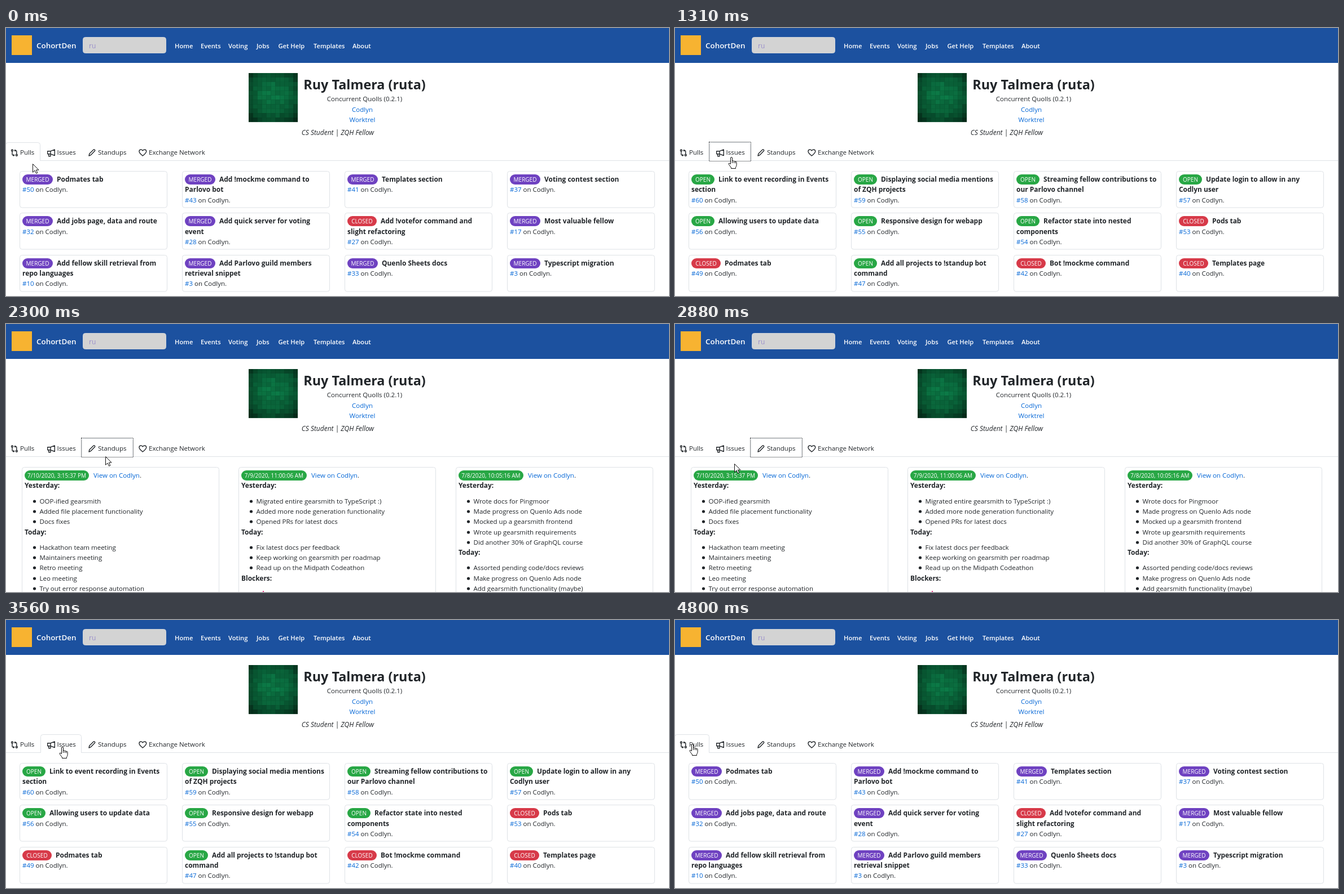
An HTML page that plays this animation: 1175x476 px, repeating every 5420 ms.

```html
<!DOCTYPE html>
<html lang="en">
<head>
<meta charset="utf-8">
<title>Fellow profile</title>
<style>
html, body { margin: 0; width: 100%; height: 100%; overflow: hidden; background: #fff; }
svg { display: block; width: 100%; height: 100%; font: 11.5px "Open Sans", "Noto Sans", sans-serif; }
text { fill: #212529; white-space: pre; }
.bold { font-size: 11.95px; font-weight: 700; }
.link { fill: #0366d6; }
.pill { fill: #fff; font-size: 10px; text-anchor: middle; }
.mid { text-anchor: middle; }
.name { font-size: 23.4px; font-weight: 700; }
.nav { fill: #fff; font-size: 11.2px; font-weight: 600; }
.brand { fill: #fff; font-size: 13.4px; font-weight: 600; }
.hint { fill: #9b90cb; font-size: 12px; }
.role { font-size: 12px; font-style: italic; }
.card { fill: #fff; stroke: #dee2e6; }
.icon { fill: none; stroke: #212529; stroke-width: 1.4; stroke-linejoin: round; }
.ring { fill: none; stroke: #212529; stroke-dasharray: 1 1; shape-rendering: crispEdges; }
.cursor { fill: #fff; stroke: #111; stroke-linejoin: round; }
</style>
</head>
<body>
<svg id="stage" viewBox="0 0 1175 476"></svg>
<script>
const LOOP = 5420;
const stage = document.getElementById('stage');

const text = (x, y, content, cls = '') => `<text x="${x}" y="${y}" class="${cls}">${content}</text>`;
const rect = (x, y, w, h, attrs) => `<rect x="${x}" y="${y}" width="${w}" height="${h}" ${attrs}/>`;
const path = (d, cls) => `<path d="${d}" class="${cls}"/>`;
const pill = (x, y, w, label, color) =>
  rect(x, y - 13, w, 18, `rx="9" fill="${color}"`) + text(x + w / 2, y, label, 'pill');

const BADGES = {
  M: ['MERGED', 54, '#6f42c1'],
  O: ['OPEN', 41, '#28a745'],
  C: ['CLOSED', 52, '#d73a49'],
};

const PULLS = [
  'M|50|Podmates tab', 'M|43|Add !mockme command to|Parlovo bot',
  'M|41|Templates section', 'M|37|Voting contest section',
  'M|32|Add jobs page, data and route', 'M|28|Add quick server for voting|event',
  'C|27|Add !votefor command and|slight refactoring', 'M|17|Most valuable fellow',
  'M|10|Add fellow skill retrieval from|repo languages', 'M|3|Add Parlovo guild members|retrieval snippet',
  'M|33|Quenlo Sheets docs', 'M|3|Typescript migration',
];

const ISSUES = [
  'O|60|Link to event recording in Events|section', 'O|59|Displaying social media mentions|of ZQH projects',
  'O|58|Streaming fellow contributions to|our Parlovo channel', 'O|57|Update login to allow in any|Codlyn user',
  'O|56|Allowing users to update data', 'O|55|Responsive design for webapp',
  'O|54|Refactor state into nested|components', 'C|53|Pods tab',
  'C|49|Podmates tab', 'O|47|Add all projects to !standup bot|command',
  'C|42|Bot !mockme command', 'C|40|Templates page',
];

const STANDUPS = [
  { date: '7/10/2020, 3:15:37 PM', width: 114, parts: [
    ['Yesterday:', 'OOP-ified gearsmith', 'Added file placement functionality', 'Docs fixes'],
    ['Today:', 'Hackathon team meeting', 'Maintainers meeting', 'Retro meeting', 'Leo meeting', 'Try out error response automation'],
  ] },
  { date: '7/9/2020, 11:00:06 AM', width: 116, parts: [
    ['Yesterday:', 'Migrated entire gearsmith to TypeScript :)', 'Added more node generation functionality', 'Opened PRs for latest docs'],
    ['Today:', 'Fix latest docs per feedback', 'Keep working on gearsmith per roadmap', 'Read up on the Midpath Codeathon'],
    ['Blockers:'],
  ] },
  { date: '7/8/2020, 10:05:16 AM', width: 115, parts: [
    ['Yesterday:', 'Wrote docs for Pingmoor', 'Made progress on Quenlo Ads node', 'Mocked up a gearsmith frontend', 'Wrote up gearsmith requirements', 'Did another 30% of GraphQL course'],
    ['Today:', 'Assorted pending code/docs reviews', 'Make progress on Quenlo Ads node', 'Add gearsmith functionality (maybe)'],
  ] },
];

function ticketCard(entry, index) {
  const [kind, number, ...lines] = entry.split('|');
  const [label, width, color] = BADGES[kind];
  const left = 24 + 288 * (index % 4);
  const row = Math.floor(index / 4);
  const baseline = line => Math.round(273 + 74.4 * row + 18.3 * line);
  const x = left + 5;
  return rect(left + 0.5, Math.round(254 + 74.4 * row) + 0.5, 261, 64.5, 'rx="4" class="card"') +
    pill(x, baseline(0), width, label, color) +
    lines.map((line, i) => text(i ? x : x + width + 7, baseline(i), line, 'bold')).join('') +
    text(x, baseline(lines.length), `<tspan class="link">#${number}</tspan> on Codlyn.`);
}

function standupCard({ date, width, parts }, index) {
  const left = 28 + Math.round(384.3 * index);
  const x = left + 5;
  let y = 273;
  let out = rect(left + 0.5, 254.5, 349, 260, 'rx="4" class="card"') +
    pill(x, y, width, date, '#28a745') +
    text(x + width + 8, y, '<tspan class="link">View on Codlyn</tspan>.');
  for (const [heading, ...items] of parts) {
    y += 18.3;
    out += text(x, Math.round(y), heading, 'bold');
    y += 9;
    for (const item of items) {
      y += 18.3;
      out += `<circle cx="${left + 22.5}" cy="${Math.round(y) - 4}" r="2.6" fill="#212529"/>` +
        text(left + 31.5, Math.round(y), item);
    }
  }
  return out;
}

function avatar() {
  let out = rect(430, 80, 87, 87, 'fill="#033d20"');
  const noise = n => { const v = Math.sin(n * 127.1 + 3.7) * 43758.5; return v - Math.floor(v); };
  for (let i = 0; i < 121; i++) {
    const col = i % 11, row = Math.floor(i / 11);
    const edge = Math.hypot(col - 5, row - 4.5) / 7;
    const light = (1 - 0.55 * edge * edge) * (0.9 + 0.2 * noise(i));
    const color = [11, 114, 66].map(c => Math.round(c * light));
    out += rect(430 + col * 7.91, 80 + row * 7.91, 8, 8, `fill="rgb(${color})"`);
  }
  return out;
}

function header() {
  const links = [['Home', 299], ['Events', 345], ['Voting', 394], ['Jobs', 444],
    ['Get Help', 482.5], ['Templates', 545], ['About', 614]];
  return rect(0, 0, 1175, 62, 'fill="#1c519f"') +
    rect(10, 13, 36, 35, 'fill="#f7b331"') +
    text(54, 36, 'CohortDen', 'brand') +
    rect(136.5, 16.5, 147, 28, 'rx="4" fill="#d3d3d3" stroke="#ced4da"') +
    text(147, 36, 'ru', 'hint') +
    links.map(([label, x]) => text(x, 36, label, 'nav')).join('');
}

function profile() {
  return avatar() +
    text(635.5, 109, 'Ruy Talmera (ruta)', 'mid name') +
    text(635.5, 130, 'Concurrent Quolls (0.2.1)', 'mid') +
    text(631.5, 149, 'Codlyn', 'mid link') +
    text(631.5, 167, 'Worktrel', 'mid link') +
    text(588, 190, 'CS Student | ZQH Fellow', 'mid role');
}

function tabLabels() {
  return path('M11 219.5v4.500q0 2 2 2h1M13.200 224.600l1.400 1.400-1.400 1.400M18.800 223.800v-4.300q0-2-2-2h-1M16.600 216.100l-1.400 1.400 1.400 1.400', 'icon') +
    '<circle cx="11" cy="217.5" r="1.5" class="icon"/><circle cx="18.8" cy="225.7" r="1.5" class="icon"/>' +
    path('M73.7 218.7h5.3l7.3-2.7v10.5l-7.3-2.7h-5.3zM75.7 224v3.7h3.3V224M79 219v4.5', 'icon') +
    path('M147 227l.9-3.8 7.3-7.2q1-.8 2 .2t.2 2l-7.2 7.5z', 'icon') +
    path('M242.3 227C238.5 224 236 221.8 236 219.2C236 215.3 240.5 214.8 242.3 218C244.2 214.8 248.7 215.3 248.7 219.2C248.7 221.8 246 224 242.3 227z', 'icon') +
    text(25, 225, 'Pulls') + text(90.5, 225, 'Issues') +
    text(163, 225, 'Standups') + text(253, 225, 'Exchange Network');
}

const activeTab = (left, right) =>
  path(`M${left} 235.5V207.5q0-4 4-4H${right - 4}q4 0 4 4V235.5`, 'card') +
  rect(left + 0.5, 235, right - left - 1, 1, 'fill="#fff"');
const focusRing = (left, right) =>
  rect(left - 1, 202.5, right - left + 2, 33.5, 'class="ring"');

const TABS = {
  pulls: { edges: [-0.5, 60.5], body: PULLS.map(ticketCard).join('') },
  issues: { edges: [61.5, 133.5], body: ISSUES.map(ticketCard).join('') },
  standups: { edges: [134.5, 224.5],
    body: STANDUPS.map(standupCard).join('') + rect(455, 474, 2, 2, 'fill="#e83e8c"') },
};

stage.innerHTML = header() + profile() + rect(0, 235, 1175, 1, 'fill="#dee2e6"') +
  Object.entries(TABS).map(([id, { edges, body }]) =>
    `<g id="${id}">${activeTab(...edges)}${body}<g id="${id}Ring">${focusRing(...edges)}</g></g>`).join('') +
  tabLabels() +
  '<g id="cursor">' +
  '<path id="arrow" class="cursor" d="M.5.5V15.3l3.5-3.3 2.5 5.3 2.3-1-2.4-5.2h4.6z"/>' +
  '<path id="hand" class="cursor" d="M-1.5 12.5V2q0-1.5 1.5-1.5T1.5 2v5q1.8-1.2 2.8.6 1.8-.8 2.6.8 2-.5 2.2 1.3v4.5q0 2.3-1.6 4.3v2H-.5v-1.5l-3.8-5.2q-1.5-2.2 0-2.7 1.2-.3 2.8 1.7zM1.5 7v4M4.3 8v3M6.9 8.5v2.8"/>' +
  '</g>';

// [start, tab, focus ring]
const SCENES = [
  [0, 'pulls', false], [1000, 'issues', false], [1310, 'issues', true],
  [2140, 'standups', false], [2200, 'standups', true],
  [3560, 'issues', false], [3930, 'issues', true], [4800, 'pulls', false],
];

// [first step, last step, number of steps]
const RUNS = [
  [140, 680, 10], [740, 740, 1], [880, 930, 2], [1000, 1000, 1], [1310, 1830, 9], [1880, 1940, 2],
  [2140, 2680, 10], [2740, 2880, 3], [2930, 3260, 6], [3370, 3560, 3],
  [3930, 4360, 8], [4440, 4440, 1], [4500, 4800, 6],
];
const STEPS = [0, ...RUNS.flatMap(([first, last, count]) =>
  Array.from({ length: count }, (_, i) => first + (last - first) * i / Math.max(1, count - 1)))];

// pointer hotspot: [time, x, y]
const TRAIL = [
  [0, 47, 241], [140, 48, 242], [260, 58, 237], [380, 76, 228], [500, 97, 217], [560, 106, 215],
  [620, 105, 220], [680, 101, 227], [740, 100, 226], [930, 99, 225], [1000, 99, 225],
  [1310, 100, 229], [1430, 112, 243], [1550, 140, 252], [1670, 180, 244], [1765, 197, 233],
  [1830, 180, 227], [1940, 176, 224], [2140, 176, 224], [2320, 176, 240], [2500, 168, 250],
  [2680, 142, 251], [2880, 105, 248], [3060, 82, 238], [3160, 84, 217], [3260, 95, 221],
  [3370, 100, 225], [3560, 100, 225], [3930, 97, 229], [4110, 56, 238], [4240, 13, 238],
  [4360, 36, 238], [4500, 36, 229], [4620, 33, 222], [4800, 31, 220], [LOOP, 31, 220],
];

const lastBefore = (list, t, key = v => v) => list.filter(v => key(v) <= t).pop();

function pointerAt(t) {
  const next = Math.max(1, TRAIL.findIndex(point => point[0] > t));
  const [t0, x0, y0] = TRAIL[next - 1];
  const [t1, x1, y1] = TRAIL[next];
  const k = (t - t0) / (t1 - t0);
  return [Math.round(x0 + (x1 - x0) * k), Math.round(y0 + (y1 - y0) * k)];
}

const byId = id => document.getElementById(id);
const show = (id, visible) => byId(id).setAttribute('display', visible ? 'inline' : 'none');

function draw(t) {
  const [, tab, focused] = lastBefore(SCENES, t, scene => scene[0]);
  for (const id in TABS) {
    show(id, id === tab);
    show(id + 'Ring', focused);
  }
  const [x, y] = pointerAt(lastBefore(STEPS, t));
  const overTab = y > 203 && y < 235 && x < 364;
  byId('cursor').setAttribute('transform', `translate(${x} ${y})`);
  show('hand', overTab);
  show('arrow', !overTab);
}

const start = performance.now();
function tick() {
  draw((performance.now() - start) % LOOP);
  requestAnimationFrame(tick);
}
tick();
</script>
</body>
</html>
```
